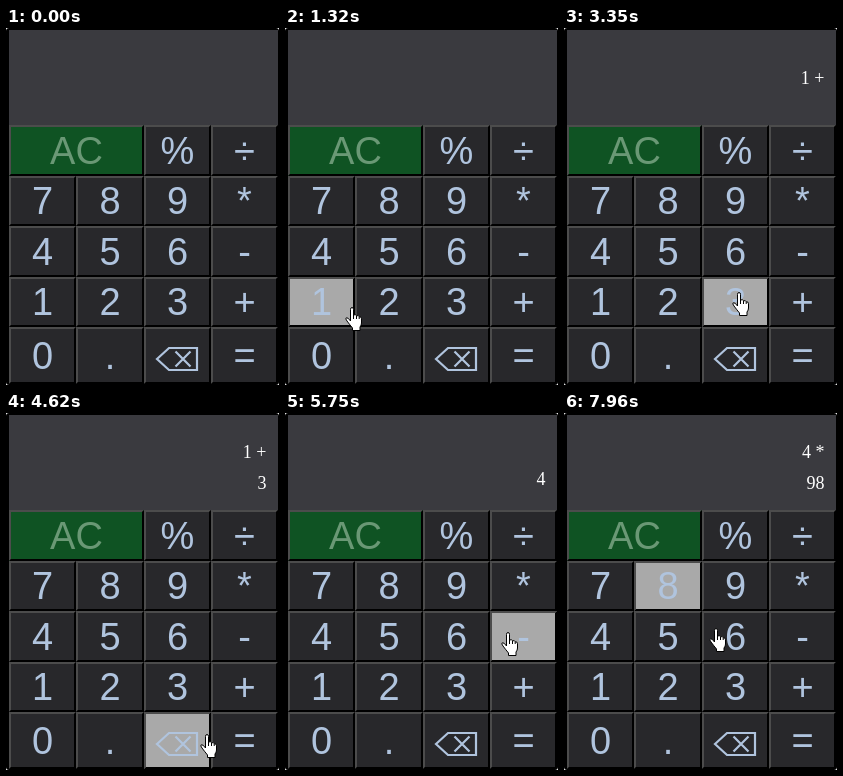
Recreate the animation shown at these times as an HTML page. Size 273 by 357 pixels, loop 8 s.

```html
<!DOCTYPE html>
<html lang="en">
<head>
<meta charset="utf-8">
<title>Calculator</title>
<style>
  html, body { margin: 0; width: 100%; height: 100%; overflow: hidden; background: #fff; }
  svg { display: block; width: 273px; height: 357px; }
  .key { font: 38px "Liberation Sans", Arial, sans-serif; text-anchor: middle; fill: #b0c4de; }
  .out { font: 18px "Liberation Serif", "Times New Roman", serif; text-anchor: end; fill: #fff; }
</style>
</head>
<body>
<svg id="stage" viewBox="0 0 273 357" xmlns="http://www.w3.org/2000/svg"></svg>
<script>
const LOOP = 8000;
const stage = document.getElementById('stage');
const COLS = [3, 70, 138, 205, 272];
const ROWS = [97, 148, 198, 249, 299, 356];
const LABELS = ['AC  %÷', '789*', '456-', '123+', '0.⌫='];
const DARK = '#28282b', HOVER = '#a9a9a9', GREEN = '#0f5323';
const LIGHT_EDGE = '#4c4c4c', DARK_EDGE = '#000';

function add(tag, attrs, parent = stage) {
  const el = document.createElementNS('http://www.w3.org/2000/svg', tag);
  for (const name in attrs) el.setAttribute(name, attrs[name]);
  return parent.appendChild(el);
}

function makeKey(label, x0, y0, x1, y1) {
  const isClear = label === 'AC';
  const base = isClear ? GREEN : DARK;
  const cx = (x0 + x1) / 2, cy = (y0 + y1) / 2;
  const face = add('rect', { x: x0, y: y0, width: x1 - x0, height: y1 - y0, fill: base });
  const topLeft = add('path', {
    d: `M${x0} ${y1}V${y0}H${x1}l-2 2H${x0 + 2}V${y1 - 2}z`, fill: LIGHT_EDGE
  });
  const bottomRight = add('path', {
    d: `M${x1} ${y0}V${y1}H${x0}l2 -2H${x1 - 2}V${y0 + 2}z`, fill: DARK_EDGE
  });
  if (label === '⌫') {
    add('path', {
      d: 'M151 331L163 320H191V342H163zM169.5 323.5l15 15m0 -15l-15 15',
      fill: 'none', stroke: '#b0c4de', 'stroke-width': 2.2
    });
  } else {
    const text = add('text', { class: 'key', x: cx, y: Math.round(cy + 13.3) });
    text.textContent = label;
    if (isClear) text.style.fill = '#6a9875';
  }
  return { label, x0, y0, x1, y1, base, face, topLeft, bottomRight };
}

add('rect', { width: 273, height: 357, rx: 3, fill: '#000' });
add('rect', { x: 3, y: 2, width: 269, height: 95, fill: '#3a3a3f' });

const keys = [makeKey('AC', COLS[0], ROWS[0], COLS[2], ROWS[1])];
LABELS.forEach((row, r) => {
  for (let c = r ? 0 : 2; c < 4; c++) {
    const label = r ? row[c] : '%÷'[c - 2];
    keys.push(makeKey(label, COLS[c], ROWS[r], COLS[c + 1], ROWS[r + 1]));
  }
});

const upper = add('text', { class: 'out', x: 260.5 });
const lower = add('text', { class: 'out', x: 260.5 });

const hand = add('g', { stroke: '#000', 'stroke-width': 1, 'stroke-linejoin': 'round' });
add('path', {
  d: 'M5.5 14V2.5a1.5 2 0 0 1 3 0V8q2.5 -1 3 .8q2.3 -.8 2.7 1q2.3 -.4 2.3 2V16' +
     'q0 2.2 -1.5 4V23.5H7.5V21Q5 18 2 14Q0 11.5 1.2 10.8Q2.8 10 5.5 14z',
  fill: '#fff'
}, hand);
add('path', { d: 'M8.5 8v4M11.5 9v3M14.2 10v2', fill: 'none' }, hand);

// Pointer moves: first step, last step, step count, destination
const START = [240, 357];
const MOVES = [
  [260, 460, 4, 222, 295],
  [527, 660, 3, 165, 268],
  [990, 1320, 6, 60, 279],
  [1380, 1570, 4, 33, 262],
  [1710, 1710, 1, 31, 263],
  [1970, 2760, 13, 231, 268],
  [3090, 3350, 5, 168, 264],
  [4500, 4620, 3, 194, 321],
  [4710, 4935, 4, 230, 318],
  [5490, 5750, 5, 216, 219],
  [5810, 6260, 8, 228, 165],
  [6620, 6750, 3, 160, 174],
  [7230, 7460, 4, 102, 171],
  [7960, 7960, 1, 145, 215]
];

// Key presses: down, up, key
const PRESSES = [
  [2820, 2880, '+'], [4160, 4290, '3'], [5085, 5160, '='],
  [6260, 6410, '*'], [6960, 7090, '9'], [7613, 7690, '8']
];

// Readout: time, upper line, lower line
const READOUT = [
  [0, '', ''], [1780, '', '1'], [2880, '1 +', ''], [4290, '1 +', '3'],
  [5160, '', '4'], [6410, '4 *', ''], [7090, '4 *', '9'], [7690, '4 *', '98']
];

// The last hover lags behind the pointer
const HOVER_HOLD = 7960;

function pointerAt(t) {
  let [x, y] = START;
  for (const [from, to, steps, tx, ty] of MOVES) {
    if (t < from) break;
    const done = to > from ? Math.floor((t - from) / (to - from) * (steps - 1) + 1e-6) + 1 : steps;
    const f = Math.min(done / steps, 1);
    x += (tx - x) * f;
    y += (ty - y) * f;
  }
  return [Math.round(x), Math.round(y)];
}

function render(t) {
  const [x, y] = pointerAt(t);
  hand.setAttribute('transform', `translate(${x} ${y})`);

  const [hx, hy] = pointerAt(Math.min(t, HOVER_HOLD - 1));
  const press = PRESSES.find(([down, up]) => t >= down && t < up);
  for (const k of keys) {
    const over = hx + 6 >= k.x0 && hx + 6 < k.x1 && hy >= k.y0 && hy < k.y1;
    const down = press && press[2] === k.label;
    k.face.setAttribute('fill', over ? HOVER : k.base);
    k.topLeft.setAttribute('fill', down ? DARK_EDGE : LIGHT_EDGE);
    k.bottomRight.setAttribute('fill', down ? LIGHT_EDGE : DARK_EDGE);
  }

  const [, top, bottom] = READOUT.filter(r => t >= r[0]).pop();
  upper.textContent = top;
  lower.textContent = bottom;
  upper.setAttribute('y', bottom ? 45 : 56);
  lower.setAttribute('y', top ? 76 : 72);
}

function tick() {
  render(performance.now() % LOOP);
  requestAnimationFrame(tick);
}
tick();
</script>
</body>
</html>
```
